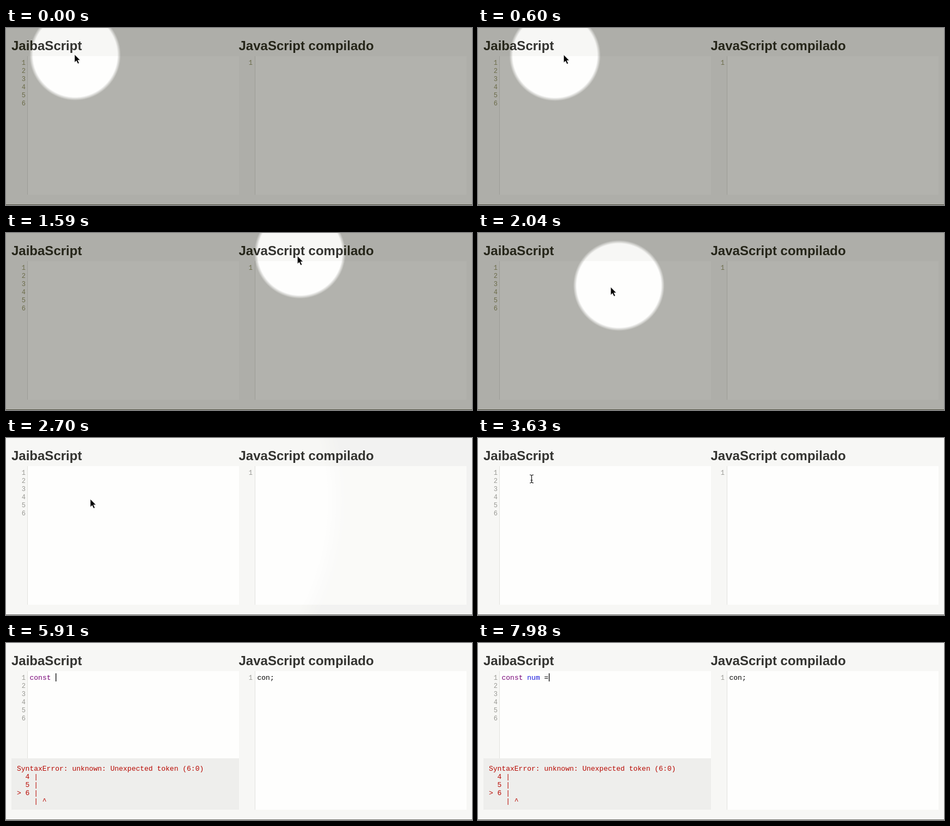
Recreate the animation shown at these times as an HTML page. Size 856 by 327 pixels, loop 8000 ms.

```html
<!DOCTYPE html>
<html lang="es">
<head>
<meta charset="utf-8">
<title>JaibaScript</title>
<style>
  html, body { margin: 0; width: 100%; height: 100%; overflow: hidden; }
  svg { display: block; width: 856px; height: 327px; }
  text { white-space: pre; font: 13px "Liberation Mono", monospace; }
  .light { --page: #f7f7f5; --panel: #fefefd; --rule: #e2e2de; --title: #333330; --number: #999994; --edge: #666660; }
  .dark { --page: #aeaea9; --panel: #b2b2ad; --rule: #9c9c96; --title: #252519; --number: #6c6c4a; --edge: #4a4a3c; }
  .page { fill: var(--page); }
  .panel { fill: var(--panel); }
  .rule { fill: var(--rule); }
  .edge { fill: var(--edge); }
  .title { font: bold 24px "Liberation Sans", Arial, sans-serif; fill: var(--title); }
  .number { font-size: 12px; fill: var(--number); text-anchor: end; }
  .error { fill: #b80800; }
</style>
</head>
<body>
<svg viewBox="0 0 856 327">
  <defs>
    <g id="stage">
      <rect class="page" width="856" height="327"/>
      <rect class="panel" x="40" y="52" width="388" height="256"/>
      <rect class="page" x="428" y="52" width="30" height="256"/>
      <rect class="panel" x="458" y="52" width="388" height="256"/>
      <rect class="rule" x="39" y="52" width="1" height="256"/>
      <rect class="rule" x="457" y="52" width="1" height="256"/>
      <rect class="edge" y="326" width="856" height="1"/>
      <text class="title" x="10" y="41">JaibaScript</text>
      <text class="title" x="427.5" y="41">JavaScript compilado</text>
      <g id="numbers"><text class="number" x="453" y="68">1</text></g>
    </g>
    <radialGradient id="soft">
      <stop offset=".92" stop-color="#fff"/>
      <stop offset="1" stop-color="#fff" stop-opacity="0"/>
    </radialGradient>
    <mask id="lit" maskUnits="userSpaceOnUse" x="0" y="0" width="856" height="327">
      <rect id="wash" width="856" height="327" fill="#fff"/>
      <circle id="spot" fill="url(#soft)"/>
    </mask>
  </defs>

  <use class="dark" href="#stage"/>
  <use class="light" href="#stage" mask="url(#lit)"/>

  <g id="error" class="error">
    <rect x="10" y="213" width="418" height="95" fill="#eeeeec"/>
  </g>
  <text x="43.5" y="68"><tspan id="keyword"></tspan><tspan id="name" fill="#1414dc"></tspan><tspan id="rest"></tspan></text>
  <text id="output" x="461.5" y="68">con;</text>
  <rect id="caret" y="56" width="1.3" height="15"/>

  <path id="arrow" d="M0 0V14.5L3.3 11.4 6 17 8.4 15.9 5.8 10.4H10.2Z" stroke="#fff" stroke-width=".6"/>
  <path id="beam" d="M-3.5-7.5Q0-7.5 0-5Q0-7.5 3.5-7.5M0-5V5M-3.5 7.5Q0 7.5 0 5Q0 7.5 3.5 7.5M-2 2.5H2" fill="none" stroke="#111" stroke-width="1.2"/>
</svg>
<script>
const LOOP = 8000, LAG = 95, CHAR = 7.8;
const FADE_START = 2430, FADE_TIME = 400, CLICK = 4000;
const SVG = 'http://www.w3.org/2000/svg';
const el = id => document.getElementById(id);
const clamp = v => Math.min(1, Math.max(0, v));
const show = (id, on) => el(id).setAttribute('visibility', on ? 'visible' : 'hidden');
const set = (id, attrs) => {
  for (const key in attrs) el(id).setAttribute(key, attrs[key]);
};

function addText(parent, className, x, y, content) {
  const node = document.createElementNS(SVG, 'text');
  node.setAttribute('class', className);
  node.setAttribute('x', x);
  node.setAttribute('y', y);
  node.textContent = content;
  el(parent).append(node);
}
for (let i = 0; i < 6; i++) addText('numbers', 'number', 36, 68 + 15 * i, i + 1);
['SyntaxError: unknown: Unexpected token (6:0)', '  4 |', '  5 |', '> 6 |', '    | ^']
  .forEach((line, i) => addText('error', 'error', 20, 236 + 15 * i, line));

// Pointer route: time, x, y
const route = [
  [0, 126, 49], [500, 140, 50], [1045, 368, 41], [1140, 412, 32], [1420, 535, 34],
  [1560, 540, 40], [1945, 258, 96], [2040, 244, 100], [2400, 165, 115],
  [2700, 155, 113], [3200, 98.5, 75.5]
];
const source = 'const num =';
const keyTimes = [4400, 4550, 4700, 5050, 5200, 5500, 6300, 6480, 6650, 7250, 7800];

// Monotone cubic through the route along one axis
function along(t, axis) {
  const last = route.length - 1;
  if (t <= 0) return route[0][axis];
  if (t >= route[last][0]) return route[last][axis];
  const chord = i => (route[i + 1][axis] - route[i][axis]) / (route[i + 1][0] - route[i][0]);
  const slope = i => {
    if (i === 0 || i === last) return 0;
    const a = chord(i - 1), b = chord(i);
    return a * b <= 0 ? 0 : 2 * a * b / (a + b);
  };
  const i = route.findIndex(p => p[0] > t) - 1;
  const span = route[i + 1][0] - route[i][0];
  const u = (t - route[i][0]) / span, v = 1 - u;
  return v * v * (1 + 2 * u) * route[i][axis] + u * u * (1 + 2 * v) * route[i + 1][axis]
    + span * u * v * (v * slope(i) - u * slope(i + 1));
}

function drawSpotlight(t) {
  const q = clamp((t - FADE_START) / FADE_TIME);
  set('wash', { opacity: 1 - (1 - q) ** 2.5 });
  set('spot', { cx: along(t - LAG, 1) + 1, cy: along(t - LAG, 2) + 1, r: 84 + 560 * q });
}

function drawPointer(t) {
  const place = { transform: `translate(${along(t, 1)} ${along(t, 2)})` };
  const faded = t >= FADE_START + FADE_TIME;
  set('arrow', place);
  set('beam', place);
  show('arrow', !faded);
  show('beam', faded && t < keyTimes[0]);
}

function drawEditor(t) {
  const count = keyTimes.filter(k => k <= t).length;
  const typed = source.slice(0, count);
  el('keyword').textContent = typed.slice(0, 6);
  set('keyword', { fill: count >= 5 ? '#770077' : '#111' });
  el('name').textContent = typed.slice(6, 9);
  el('rest').textContent = typed.slice(9);
  const since = t - (count ? keyTimes[count - 1] : CLICK);
  set('caret', { x: 44.3 + count * CHAR });
  show('caret', since >= 0 && since % 1060 < 530);
  show('output', t >= 4900);
  show('error', t >= 5600);
}

function frame(now) {
  const t = now % LOOP;
  drawSpotlight(t);
  drawPointer(t);
  drawEditor(t);
  requestAnimationFrame(frame);
}
frame(0);
</script>
</body>
</html>
```
